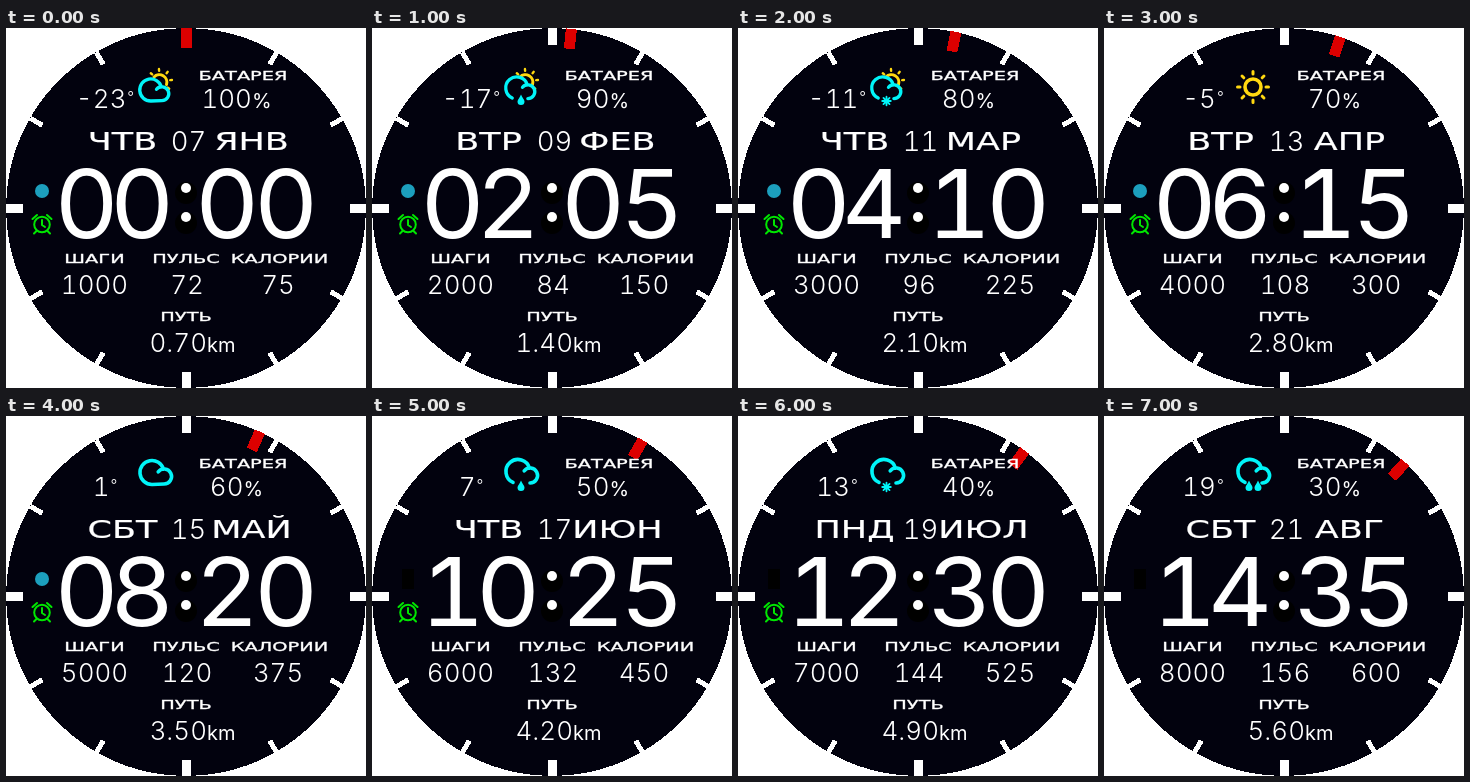
An HTML page that plays this animation: 360 px wide and 360 px high, repeating every 8 s.

```html
<!DOCTYPE html>
<html lang="ru">
<head>
<meta charset="utf-8">
<title>Циферблат</title>
<style>
html, body { margin: 0; width: 100%; height: 100%; overflow: hidden; background: #fff; }
svg { display: block; width: 100vw; height: 100vh; }
text { fill: #fff; text-anchor: middle; font-family: Inter, "Open Sans", sans-serif; font-weight: 350; font-variant-numeric: tabular-nums; }
.num { font-size: 26px; }
.mid { font-size: 27.5px; }
.unit { font-size: 20px; font-weight: 400; }
.deg { font-size: 15px; }
.big { font-size: 95px; font-weight: 375; }
.wide { font-family: "DejaVu Sans", Roboto, sans-serif; font-weight: 400; }
.label { font-size: 12.5px; stroke: #fff; stroke-width: .3px; }
.date { font-size: 24.5px; stroke: #fff; stroke-width: .2px; }
.line { fill: none; stroke-linecap: round; stroke-linejoin: round; }
</style>
</head>
<body>
<svg viewBox="0 0 360 360" xmlns="http://www.w3.org/2000/svg">
  <rect width="360" height="360" fill="#fff"/>
  <g shape-rendering="crispEdges">
    <circle cx="180" cy="180" r="180" fill="#02020e"/>
    <g id="ticks" fill="#fff"></g>
    <rect id="hand" x="175" y="0" width="11" height="20" fill="#dc0000"/>
  </g>
  <g id="weather" class="line" stroke="#00f4f8" stroke-width="3.6"></g>
  <g id="labels"></g>
  <g id="values"></g>
  <g fill="#000">
    <circle cx="180" cy="165" r="11"/>
    <circle cx="180" cy="195" r="11"/>
  </g>
  <g fill="#fff">
    <circle cx="180" cy="160" r="5"/>
    <circle cx="180" cy="189" r="5"/>
  </g>
  <rect id="linkOff" x="30" y="153" width="12" height="20" fill="#000"/>
  <circle id="link" cx="36" cy="163" r="7" fill="#1c9fbd"/>
  <g id="alarm" class="line" stroke="#00e600" stroke-width="2">
    <circle cx="36" cy="196.5" r="7.8"/>
    <path d="M36 192V197L39 199M26.5 191L31 187M45.5 191L41 187M30.5 203L28 205.5M41.5 203L44 205.5"/>
  </g>
</svg>
<script>
const STEP = 1000, COUNT = 8;
const DAYS = ["ВСК", "ПНД", "ВТР", "СРД", "ЧТВ", "ПТН", "СБТ"];
const MONTHS = ["ЯНВ", "ФЕВ", "МАР", "АПР", "МАЙ", "ИЮН", "ИЮЛ", "АВГ"];
const SKY = ["sun cloud", "sun cloud drop", "sun cloud snow", "clear",
             "cloud", "cloud drop", "cloud snow", "cloud drops"];
const $ = id => document.getElementById(id);
const pad = n => String(n).padStart(2, "0");
const turn = deg => `rotate(${deg} 180.5 180.5)`;

function addText(parent, cls, x, y, stretch = 1) {
  const el = document.createElementNS("http://www.w3.org/2000/svg", "text");
  el.setAttribute("class", cls);
  el.setAttribute("transform", `translate(${x} ${y}) scale(${stretch} 1)`);
  $(parent).append(el);
  return el;
}

const label = (s, x, y) => { addText("labels", "wide label", x, y, 1.55).textContent = s; };
label("БАТАРЕЯ", 237, 52);
label("ШАГИ", 88.5, 235);
label("ПУЛЬС", 180, 235);
label("КАЛОРИИ", 273.5, 235);
label("ПУТЬ", 180, 293);

const value = (x, y, cls = "num", stretch) => addText("values", cls, x, y, stretch);
const word = x => value(x, 122, "wide date", 1.43);
const out = {
  temp: value(99, 80), battery: value(230.5, 80),
  day: word(116.5), date: value(182.5, 123, "mid"), month: word(245.5),
  steps: value(88.5, 266), pulse: value(181, 266), kcal: value(272, 266), path: value(186.5, 324)
};
const clock = [80.5, 136, 221, 280].map(x => value(x, 210, "big", 1.05));

$("ticks").innerHTML = Array.from({ length: 12 }, (_, i) => {
  const main = i % 3 === 0, w = main ? 9 : 5, h = main ? 17 : 14;
  return `<rect x="${180.5 - w / 2}" width="${w}" height="${h}" transform="${turn(i * 30)}"/>`;
}).join("");

function rays(cx, cy, r1, r2, from, n) {
  let d = "";
  for (let i = 0; i < n; i++) {
    const a = (from + i * 45) * Math.PI / 180, c = Math.cos(a), s = Math.sin(a);
    d += `M${cx + r1 * c} ${cy + r1 * s}L${cx + r2 * c} ${cy + r2 * s}`;
  }
  return d;
}

const drop = (x, y) =>
  `<path d="M${x} ${y - 5}C${x + 1} ${y - 2} ${x + 3.5} ${y} ${x + 3.5} ${y + 2}A3.5 3.5 0 0 1 ${x - 3.5} ${y + 2}C${x - 3.5} ${y} ${x - 1} ${y - 2} ${x} ${y - 5}Z" fill="#00f4f8" stroke="none"/>`;

const flake = (x, y) => `<path stroke-width="1.8" d="${rays(x, y, 0, 4.3, 0, 8)}"/>`;

// A large lobe on the left and a small one on the right, open below when wet
function cloud(wet) {
  const from = wet ? "141 67.4" : "146 68.5";
  return `M${from}A12 12 0 1 1 157.5 53.2M152.2 55.8A7.5 7.5 0 1 1 158 68${wet ? "" : "L146 68.5"}`;
}

function drawSky(kind) {
  const parts = kind.split(" "), has = p => parts.includes(p);
  const sunny = has("sun"), wet = parts.length > (sunny ? 2 : 1);
  const sun = 'stroke="#ffd810"';
  if (has("clear"))
    return `<g ${sun}><circle cx="149" cy="59" r="8"/><path stroke-width="3" d="${rays(149, 59, 13, 15.5, 0, 8)}"/></g>`;
  let s = "";
  if (sunny)
    s += `<g ${sun}><path stroke-width="3" d="M148 49A7.5 7.5 0 0 1 160.5 56.5"/>` +
         `<path stroke-width="2.4" d="${rays(154, 53, 10.2, 12, -140, 5)}"/></g>`;
  const place = sunny ? `translate(10.5 ${wet ? 8 : 10}) scale(.92)` : `translate(0 ${wet ? -1 : 0})`;
  s += `<path transform="${place}" d="${cloud(wet)}"/>`;
  const y = sunny ? 71.5 : 69.5;
  if (has("drop")) s += drop(149, y);
  if (has("drops")) s += drop(145, y) + drop(154, y);
  if (has("snow")) s += flake(148.5, y + 1.5);
  return s;
}

const unit = (n, u) => `${n}<tspan class="unit">${u}</tspan>`;
let shown = -1;

function render(ms) {
  const i = Math.floor(ms / STEP) % COUNT;
  if (i === shown) return;
  shown = i;
  const day = 7 + 2 * i;
  out.temp.innerHTML = `${6 * i - 23}<tspan class="deg" dx="1" dy="-6">°</tspan>`;
  out.battery.innerHTML = unit(100 - 10 * i, "%");
  out.day.textContent = DAYS[new Date(2021, i, day).getDay()];
  out.date.textContent = pad(day);
  out.month.textContent = MONTHS[i];
  out.steps.textContent = 1000 * (i + 1);
  out.pulse.textContent = 72 + 12 * i;
  out.kcal.textContent = 75 * (i + 1);
  out.path.innerHTML = unit((0.7 * (i + 1)).toFixed(2), "km");
  [...pad(2 * i) + pad(5 * i)].forEach((c, k) => { clock[k].textContent = c; });
  $("hand").setAttribute("transform", turn(6 * i));
  $("weather").innerHTML = drawSky(SKY[i]);
  const linked = i < 5;
  $("link").style.display = linked ? "" : "none";
  $("linkOff").style.display = linked ? "none" : "";
  $("alarm").style.display = i < 7 ? "" : "none";
}

const start = performance.now();
function tick() {
  render(performance.now() - start);
  requestAnimationFrame(tick);
}
tick();
</script>
</body>
</html>
```
